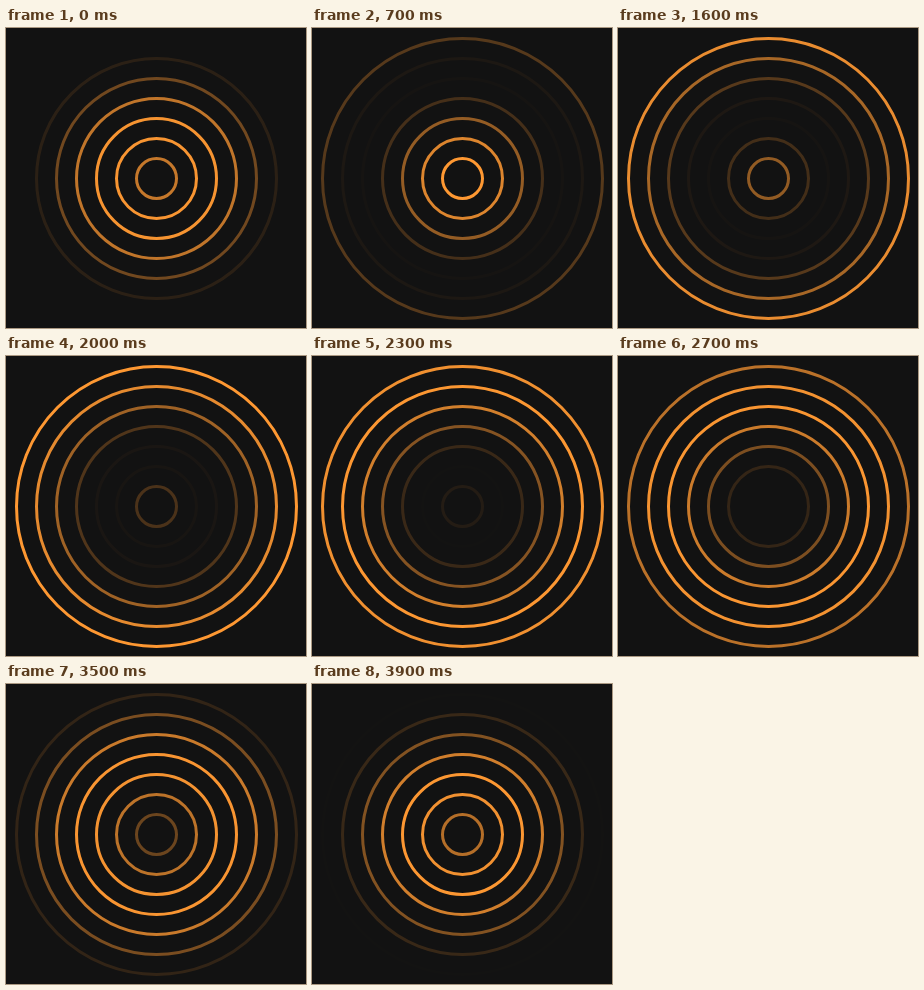
An HTML page that plays this animation: 300 by 300 pixels, repeating every 4 s.

```html
<!DOCTYPE html>
<html lang="en">
<head>
<meta charset="utf-8">
<title>Pulsing rings</title>
<style>
  html, body { margin: 0; width: 100%; height: 100%; overflow: hidden; background: #121212; }
  svg { display: block; width: 300px; height: 300px; }
  circle { fill: none; stroke: #ff9933; stroke-width: 3; }
</style>
</head>
<body>
<svg id="stage" viewBox="0 0 300 300"></svg>
<script>
  const RINGS = 7, GAP = 20, CENTER = 150.5;
  const LOOP = 4000, STEPS = 40;
  const LAG = 0.7; // phase shift between neighbouring rings, in radians
  const stage = document.getElementById('stage');

  const glow = (step, ring) =>
    0.5 + 0.5 * Math.sin(2 * Math.PI * (step - 1) / STEPS + LAG * ring);

  for (let ring = 1; ring <= RINGS; ring++) {
    const circle = document.createElementNS('http://www.w3.org/2000/svg', 'circle');
    circle.setAttribute('cx', CENTER);
    circle.setAttribute('cy', CENTER);
    circle.setAttribute('r', ring * GAP);
    stage.append(circle);

    // Each pose is held until the next step.
    const poses = Array.from({ length: STEPS + 1 }, (_, step) => ({
      opacity: glow(step, ring),
      easing: 'steps(1, end)'
    }));
    const pulse = circle.animate(poses, { duration: LOOP, iterations: Infinity });
    pulse.startTime = 0;
  }
</script>
</body>
</html>
```
